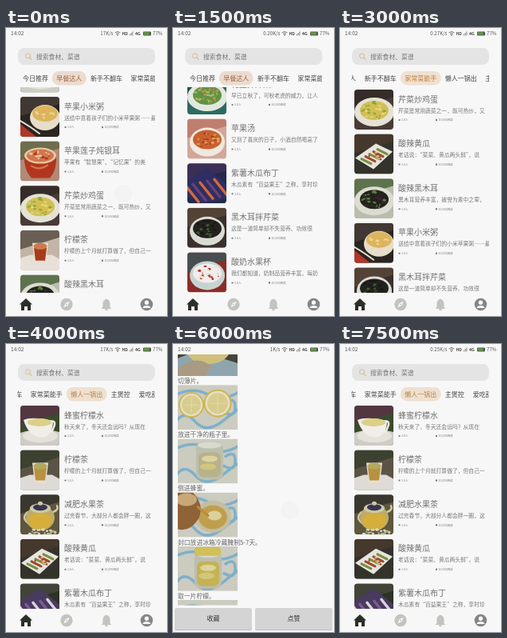
Animation, 202 px wide and 360 px high, one loop 8000 ms. Source, as an HTML page:

```html
<!DOCTYPE html>
<html lang="zh-CN">
<head>
<meta charset="utf-8">
<title>菜谱</title>
<style>
  html, body { margin: 0; width: 100%; height: 100%; overflow: hidden; background: #f7f7f7; }
  svg { display: block; }
  #stage { width: 100vw; height: 100vh; }
  text { font-family: "Noto Sans CJK SC", "Noto Sans CJK", "Noto Sans", sans-serif; white-space: pre; }
  .scene { display: none; }
  .scene.on { display: inline; }
</style>
</head>
<body>
<svg id="stage" viewBox="0 0 202 360" preserveAspectRatio="none">
  <defs>
    <clipPath id="thumbClip"><rect width="49" height="50" rx="4"/></clipPath>
    <clipPath id="listClip"><rect x="15" y="74" width="172" height="257"/></clipPath>
    <clipPath id="tabClip"><rect x="14.5" y="50" width="172.5" height="24"/></clipPath>
    <clipPath id="pageClip"><rect y="13" width="202" height="313.5"/></clipPath>
    <clipPath id="photoClip"><rect width="75" height="56"/></clipPath>
  </defs>
</svg>
<script>
const STEP = 500, PITCH = 55.6, PAPER = '#f7f7f7';

// ---------- drawing helpers ----------
const text = (x, cy, size, str, fill = '#555', extra = '') =>
  `<text x="${x}" y="${(cy + size * 0.37).toFixed(2)}" font-size="${size}" fill="${fill}" ${extra}>${str}</text>`;
const rect = (x, y, w, h, fill, rx = 0) =>
  `<rect x="${x}" y="${y}" width="${w}" height="${h}" rx="${rx}" fill="${fill}"/>`;
const oval = (x, y, rx, ry, fill, extra = '') =>
  `<ellipse cx="${x}" cy="${y}" rx="${rx}" ry="${ry}" fill="${fill}" ${extra}/>`;
const path = (d, fill, extra = '') => `<path d="${d}" fill="${fill}" ${extra}/>`;
const line = (d, color, w) => path(d, 'none', `stroke="${color}" stroke-width="${w}" stroke-linecap="round"`);
const move = (x, y, body, extra = '') => `<g transform="translate(${x} ${y})" ${extra}>${body}</g>`;

function random(seed) {
  return () => (seed = (seed * 16807) % 2147483647) / 2147483647;
}

function bits(cx, cy, rx, ry, colors, count, seed) {
  const rnd = random(seed * 7919 + 13);
  let out = '';
  for (let i = 0; i < count; i++) {
    const a = rnd() * 6.283, r = Math.sqrt(rnd()) * 0.9;
    out += oval((cx + Math.cos(a) * r * rx).toFixed(1), (cy + Math.sin(a) * r * ry).toFixed(1),
      (1 + rnd() * 1.6).toFixed(1), (0.8 + rnd()).toFixed(1), colors[i % colors.length]);
  }
  return out;
}

// ---------- food pictures, 49 x 50 ----------
const kinds = {
  bowl: (c, s) => oval(25, 29, 22, 18, c[0]) + oval(25, 26, 18, 12, c[1]) + bits(25, 26, 17, 11, c.slice(1), 36, s),
  plate: (c, s) => oval(25, 28, 25, 18, c[0]) + oval(25, 26, 18, 12, c[1]) + bits(25, 26, 18, 12, c.slice(1), 50, s),
  porridge: (c, s) => path('M0 34L20 50H0Z', c[3]) + oval(31, 26, 19, 16, c[0]) + oval(31, 21, 16, 10, c[1]) +
    bits(31, 21, 14, 8, c.slice(1, 3), 16, s) + line('M0 30Q14 38 24 46', c[0], 2),
  crock: (c, s) => path('M5 18H45Q46 37 37 46H14Q4 36 5 18Z', c[0]) + oval(25, 18, 20, 10, c[2]) +
    oval(25, 18, 17, 8, c[1]) + bits(25, 18, 15, 6, [c[2], c[0]], 16, s) + line('M14 31Q24 37 34 30', c[1], 2),
  tea: c => path('M0 35L12 31H40L49 36V50H0Z', c[2]) + path('M15 16H35L32 41H18Z', '#e7e0d4') +
    path('M17 22H33L31 38H19Z', c[0]) + oval(25, 20, 8.5, 4, c[1]),
  jars: c => [4, 26].map((x, i) => rect(x, 13 + i * 4, 20, 33, c[0], 4) +
    rect(x + 2, 8 + i * 4, 16, 7, c[1], 2) + rect(x + 3, 22 + i * 4, 8, 14, c[2], 2)).join(''),
  mug: c => line('M34 21Q46 20 35 34', c[0], 3) + path('M9 17H37Q37 39 29 43H17Q10 38 9 17Z', c[0]) +
    oval(23, 17, 14, 5, c[1]) + bits(25, 47, 22, 3, [c[2]], 18, 5),
  pot: (c, s) => line('M9 22Q0 30 12 37M38 23Q49 20 46 14', c[2], 2.5) + oval(25, 29, 18, 16, c[0]) +
    oval(25, 33, 15, 10, c[1]) + oval(25, 17, 13, 6, c[2]) + oval(25, 16, 9, 4, '#39344e') +
    oval(25, 11, 3, 2.5, c[2]) + bits(25, 47, 23, 4, ['#dcd8c4', '#b9b48c'], 20, s),
  boat: c => path('M0 34Q24 26 49 33V50H0Z', '#cdccc5') + oval(25, 38, 22, 8, '#e4e2da') + line('M37 20Q48 17 39 33', c[0], 2.5) +
    path('M4 18Q15 13 41 19Q41 38 26 40Q10 38 4 18Z', c[0]) + oval(24, 21, 15, 5, c[1]),
  sticks: (c, s) => path('M1 30L27 12L48 22L24 44Z', c[0]) +
    [0, 1, 2, 3, 4].map(i => line(`M${9 + i * 5} ${31 - i * 3}l12 6`, c[1 + i % 2], 3)).join('') + bits(27, 27, 10, 7, [c[2], c[3]], 12, s),
  stripes: c => path('M0 22L24 6L49 26V44L22 50L0 42Z', c[0]) +
    [0, 1, 2, 3, 4].map(i => line(`M${-2 + i * 9} ${28 - i * 2}l16 20`, c[1 + i % 2], 3.4)).join('')
};

// title, description, kind, backdrop, second backdrop, colours
const dishes = {
  porridge: ['苹果小米粥', '送给中意着孩子们的小米苹果粥——最', 'porridge', '#2b2522', '#4a3f38', ['#e6ddca', '#dcb45c', '#ecd394', '#b0372a']],
  fungus: ['苹果莲子炖银耳', '苹果有“智慧果”、“记忆果”的美', 'crock', '#b08a76', '#59633f', ['#b2361f', '#d2764a', '#e8c8a4']],
  egg: ['芹菜炒鸡蛋', '芹菜是常用蔬菜之一，既可热炒，又', 'plate', '#4a3a36', '#2e2724', ['#e4e2d6', '#d2bf52', '#8fa544', '#e6d878']],
  redTea: ['柠檬茶', '柠檬的上个月就打算做了，但自己一', 'tea', '#c3b5a6', '#4b4338', ['#a83c1c', '#cf7a4c', '#e8e0d8']],
  ear: ['酸辣黑木耳', '黑木耳营养丰富，被誉为素中之荤，', 'plate', '#b9bdae', '#3f5a2c', ['#dcdcd2', '#242120', '#55803a', '#3a2a24']],
  honey: ['蜂蜜柠檬水', '秋天来了，冬天还会远吗？从现在', 'boat', '#3a4a2c', '#5a3048', ['#f0eee8', '#dccf86']],
  tea: ['柠檬茶', '柠檬的上个月就打算做了，但自己一', 'tea', '#5b5446', '#333b28', ['#b9923f', '#b3a860', '#dedad6']],
  slim: ['减肥水果茶', '过完春节，大部分人都会胖一圈，这', 'pot', '#5d573f', '#2f2d2a', ['#c0ab66', '#d6ae3c', '#cfc8ac']],
  soy: ['苹果豆浆', '鲜豆浆是惟一类似于动物蛋白质的植', 'mug', '#20294a', '#3a3a4a', ['#e9ebee', '#f4efdf', '#c9ab72']],
  jam: ['苹果酱', '红红的大苹果人见人爱，家苹果的好', 'jars', '#d5cfae', '#9fa77a', ['#ddbd52', '#ece6cf', '#f0dd94']],
  peanut: ['花生拌芹菜', '早已立秋了，可秋老虎的威力，让人', 'bowl', '#4a3d2c', '#272219', ['#e8e5dc', '#a08a35', '#c9a552', '#6d8a30']],
  celery: ['花生拌芹菜', '早已立秋了，可秋老虎的威力，让人', 'plate', '#2d6a62', '#1d4a48', ['#e3e8df', '#5f9445', '#c98b4a', '#a5c06b']],
  soup: ['苹果汤', '又到了喜庆的日子，小酒自然喝高了', 'bowl', '#d3a796', '#b87262', ['#efe9e0', '#c8622f', '#e3a25a', '#a83c22']],
  pudding: ['紫薯木瓜布丁', '木瓜素有“百益果王”之称，享时珍', 'stripes', '#232a4c', '#43305a', ['#2d2f63', '#d8683a', '#6b3f78']],
  purple: ['紫薯木瓜布丁', '木瓜素有“百益果王”之称，享时珍', 'stripes', '#2c3326', '#4a4a3c', ['#493a60', '#d9d3dc', '#7a5b93']],
  black: ['黑木耳拌芹菜', '这是一道简单却不失营养、功效很', 'bowl', '#38312d', '#5c4a3a', ['#dcdcd6', '#22221f', '#3f5a2c', '#191818']],
  yogurt: ['酸奶水果杯', '我们都知道，奶制品营养丰富，每奶', 'bowl', '#8a2d27', '#2f5a5c', ['#c7d3d2', '#f0eeea', '#e5e2de', '#b8342e']],
  cucumber: ['酸辣黄瓜', '老话说：“菜菜、黄瓜两头鲜”，说', 'sticks', '#33332c', '#4b3a2c', ['#e6e4de', '#76903f', '#a1492f', '#d8c27a']]
};

function picture(key) {
  const [, , kind, bg, bg2, colors] = dishes[key];
  return rect(0, 0, 49, 50, bg) + path('M0 0H49V9L0 24Z', bg2, 'opacity=".75"') + kinds[kind](colors, key.length + key.charCodeAt(0));
}

const card = (key, y) => move(18, y, `<g clip-path="url(#thumbClip)">${picture(key)}</g>` +
  text(55, 12, 10, dishes[key][0], '#707070', 'font-weight="300"') +
  text(55, 26, 6.8, dishes[key][1], '#777') +
  oval(56.5, 38, 1.2, 1, '#777') + text(59, 38, 3.6, '1.0人', '#777') +
  oval(103, 38, 1.1, 1.3, '#777') + text(105.5, 38, 3.6, '10,000阅读', '#777'));

const lists = {
  breakfast: 'honey porridge fungus egg redTea ear soy slim celery soup pudding black yogurt',
  novice: 'jam soy slim peanut soup pudding',
  home: 'egg cucumber ear porridge black peanut',
  lazy: 'honey tea slim cucumber purple jam'
};

// ---------- app chrome ----------
const status = speed => rect(0, 0, 202, 13, PAPER) + text(6, 7, 6.6, '14:02', '#555') +
  text(134.5, 7, 6.2, speed, '#555', 'text-anchor="end"') +
  line('M137 5.6Q140 3.2 143 5.6M138.3 7.2Q140 5.8 141.7 7.2', '#555', 0.8) + oval(140, 8.9, 0.8, 0.8, '#555') +
  text(145.5, 7, 5, 'HD', '#444', 'font-weight="700"') +
  line('M155.5 9V8M157.2 9V6.4M158.9 9V4.8', '#666', 0.8) + text(162, 7, 5.2, '4G', '#444', 'font-weight="700"') +
  rect(172, 4.4, 10, 5, '#555', 1) + rect(172.8, 5.2, 7, 3.4, '#5d9a45') + text(184, 7, 6.2, '77%', '#555');

const search = rect(15, 25, 172, 21, '#e4e4e4', 8) +
  `<circle cx="27.5" cy="34.8" r="3" fill="none" stroke="#d3bd94" stroke-width="1"/>` + line('M29.8 37.2L32 39.5', '#d3bd94', 1.1) +
  text(38, 36, 7.8, '搜索食材、菜谱', '#777');

const pale = '#c3c3c0', gray = '#868686';
const nav = rect(0, 331, 202, 29, PAPER) +
  path('M25 338L33 345.5H31V353H27V348H23V353H19V345.5H17Z', '#2a2f28') +
  oval(76, 345.5, 7.7, 7.7, pale) + path('M79.6 341.8L77.5 347L72.4 349.2L74.5 344Z', PAPER) + oval(76, 345.5, 1, 1, pale) +
  path('M126 338.5Q130.6 340 130.6 345V349L132.5 351H119.5L121.4 349V345Q121.4 340 126 338.5Z', pale) + oval(126, 352, 1.8, 1.3, pale) +
  oval(176.5, 345.5, 7.8, 7.8, gray) + oval(176.5, 343.3, 2.6, 2.7, PAPER) + path('M171.5 350Q172 347 176.5 347T181.5 350Z', PAPER);

const tabNames = [['今日推荐', 21], ['早餐达人', 63.2], ['新手不翻车', 106], ['家常菜能手', 156.5],
  ['懒人一锅出', 207], ['主煲控', 257.5], ['爱吃甜品', 292.5]];

function tabs(active, shift, pill, ink) {
  return `<g clip-path="url(#tabClip)">` + tabNames.map(([name, x], i) => {
    const on = i === active;
    return (on ? rect(x + shift - 5.5, 54, name.length * 8 + 11, 17.5, pill, 8.5) : '') +
      text(x + shift, 63, 8, name, on ? ink : '#444');
  }).join('') + '</g>';
}

const touch = (x, y, strong) => oval(x, y, 10.5, 10.5, strong ? '#ddd' : '#f1f1f1',
  `opacity="${strong ? 0.75 : 0.5}" stroke="${strong ? '#ccc' : '#e2e2e2'}" stroke-width=".5"`);

const looks = {
  breakfast: [1, 0, '#ecdbcf', '#a05f3f'],
  novice: [2, -24.7, '#f4dfcc', '#d07a30'],
  home: [3, -75.2, '#f1e0d0', '#c07f3c'],
  lazy: [4, -125.7, '#efe0d0', '#b68347']
};
const glow = path('M15 331V318Q100 297 187 310V331Z', '#6fb0a8', 'opacity=".62"');

const listScene = (speed, list, top, over = '') =>
  `<g clip-path="url(#listClip)">` +
  lists[list].split(' ').map((key, i) => {
    const y = top + i * PITCH;
    return y > 15 && y < 335 ? card(key, y.toFixed(1)) : '';
  }).join('') + over + '</g>' +
  status(speed) + search + tabs(...looks[list]) + nav;

// ---------- recipe page ----------
const lemon = (x, y, r) => oval(x, y, r, r, '#cdb552') + oval(x, y, r * 0.88, r * 0.88, '#e6e0c4') +
  oval(x, y, r * 0.74, r * 0.74, '#d8cc8c') +
  line(`M${x - r * .6} ${y}H${x + r * .6}M${x} ${y - r * .6}V${y + r * .6}`, '#e6e0c4', 0.7);
const jar = (x, y, fill) => rect(x, y, 34, 47, '#bcbfae', 8) + rect(x + 3, y + 13, 28, 31, fill, 7) +
  oval(x + 17, y + 4, 15, 4, '#d9dace') + oval(x + 17, y + 21, 10, 4, '#dcd49c') + oval(x + 15, y + 31, 10, 4, '#d2c67c');
const cloth = rect(0, 0, 75, 56, '#cbcbc0') +
  line('M-2 12Q20 2 38 12T78 8M-2 46Q8 30 22 46T58 44T80 30M60 22Q72 14 72 28T58 34', '#7fb0c8', 3.5);

const photos = [
  rect(0, 0, 75, 56, '#46443a') + path('M0 56V34L24 24L75 40V56Z', '#8fa5ae') + oval(38, 24, 27, 17, '#cfc07c') +
    oval(34, 19, 17, 9, '#e6dfba') + path('M0 46Q25 28 42 44L34 56H0Z', '#a99a84'),
  cloth + lemon(17, 25, 16) + lemon(50, 23, 17.5),
  cloth + jar(23, 4, '#b5b28c'),
  cloth + oval(44, 30, 23, 20, '#c4bfa2') + oval(44, 31, 18, 15, '#bf9f4e') + oval(46, 29, 9, 6, '#dcd09a') +
    path('M0 0H19Q34 16 26 33Q15 50 0 46Z', '#8f6238') + oval(11, 9, 13, 8, '#c9a878') + line('M25 18L38 29', '#b98a3c', 3),
  cloth + jar(21, 6, '#c4b254') + rect(21, 1, 33, 11, '#cfc05a', 4),
  cloth + lemon(36, 29, 19),
  cloth + oval(38, 34, 27, 17, '#e6e5dd') + oval(38, 31, 21, 11, '#d8ca80') + lemon(38, 30, 8),
  cloth + jar(21, 4, '#d0c078')
];
const steps = ['柠檬用水打湿，用盐搓1-2分钟。', '切薄片。', '放进干净的瓶子里。', '倒进蜂蜜。',
  '封口放进冰箱冷藏腌制5-7天。', '取一片柠檬。', '放进杯子里。', '加温水冲开即可。'];
const intro = ['秋天来了，冬天还会远吗？从现在起，每天早', '晨空腹喝一杯蜂蜜柠檬水，不仅有效改善便',
  '秘，还能美容养颜，祛斑美白。而且秋冬季节', '人容易受凉引起感冒发烧，多食用富含维C的水', '果也可以预防感冒的发生。'];
const stuff = [['盐', '适量'], ['蜂蜜', '1瓶'], ['柠檬', '1个']];
const facts = [['准备时间', 28, '#8a6a4a'], ['制作时间', 91, '#8a7a4a'], ['用餐人数', 157, '#7a5a78']];

const heading = (y, str) => rect(9, y - 6.5, 2, 13, '#8a6038') + text(13, y, 10, str, '#444', 'font-weight="500"');
const quote = (x, y, mark) => `<text x="${x}" y="${y}" font-size="26" fill="#bdbdbd" style="font-family:'Liberation Serif',serif;font-weight:700">${mark}</text>`;

const hero = `<svg x="0" y="-152" width="202" height="142" viewBox="0 8 49 34" preserveAspectRatio="none">${picture('honey')}</svg>`;

const recipe = hero +
  facts.map(([name, x, c]) => oval(x - 9, 14, 4, 4, c) + text(x, 14, 8.4, name, '#777')).join('') +
  text(101.5, 45.5, 12.2, '蜂蜜柠檬水', '#555', 'text-anchor="middle" font-weight="300"') +
  quote(5, 73, '“') + quote(184, 156, '”') +
  intro.map((s, i) => text(8, 78 + i * 11.6, 8.95, s, '#666')).join('') +
  rect(0, 153.5, 202, 5, '#dedede') + heading(181.5, '需要材料') +
  stuff.map(([a, b], i) => text(28, 203.5 + i * 11, 7.8, a, '#777') + text(157.5, 203.5 + i * 11, 7.8, b, '#777')).join('') +
  rect(0, 236, 202, 5, '#dedede') + heading(263, '烹饪做法') +
  steps.map((s, i) => text(6, 286 + i * 67.2, 7.8, s, '#666') +
    move(6, (291 + i * 67.2).toFixed(1), photos[i], 'clip-path="url(#photoClip)"')).join('');

const button = (x, str) => rect(x, 331, 97, 27, '#bdbdbd', 2) + rect(x, 330, 97, 27, '#d4d4d4', 2) +
  text(x + 48.5, 343.5, 8, str, '#333', 'text-anchor="middle"');

const pageScene = (speed, shift, over = '') =>
  `<g clip-path="url(#pageClip)">${move(0, shift, recipe)}</g>` + over + status(speed) + button(2, '收藏') + button(103, '点赞');

// ---------- one scene per half second ----------
const listTop = 77, listEnd = -386.8;
const scenes = [
  listScene('17K/s', 'breakfast', 30.4, touch(147, 207)),
  listScene('17K/s', 'breakfast', -190),
  listScene('0.20K/s', 'breakfast', listEnd, glow),
  listScene('0.20K/s', 'breakfast', listEnd),
  listScene('0.20K/s', 'breakfast', listEnd),
  listScene('0.27K/s', 'novice', listTop, touch(98, 231.5, true)),
  listScene('0.27K/s', 'home', listTop),
  listScene('0.27K/s', 'lazy', listTop),
  listScene('17K/s', 'lazy', listTop),
  pageScene('17K/s', 165),
  pageScene('17K/s', 0, touch(147, 207)),
  pageScene('1K/s', -153),
  pageScene('1K/s', -307, touch(147, 208)),
  pageScene('1K/s', -457),
  pageScene('0.25K/s', -491),
  listScene('0.25K/s', 'lazy', listTop)
];

const stage = document.getElementById('stage');
stage.insertAdjacentHTML('beforeend', scenes.map(s => `<g class="scene">${s}</g>`).join(''));
const groups = stage.querySelectorAll('.scene');
const start = performance.now();
let current = -1;

function tick() {
  const next = Math.floor((performance.now() - start) / STEP) % groups.length;
  if (next !== current) {
    if (current >= 0) groups[current].classList.remove('on');
    groups[next].classList.add('on');
    current = next;
  }
  requestAnimationFrame(tick);
}
tick();
</script>
</body>
</html>
```
